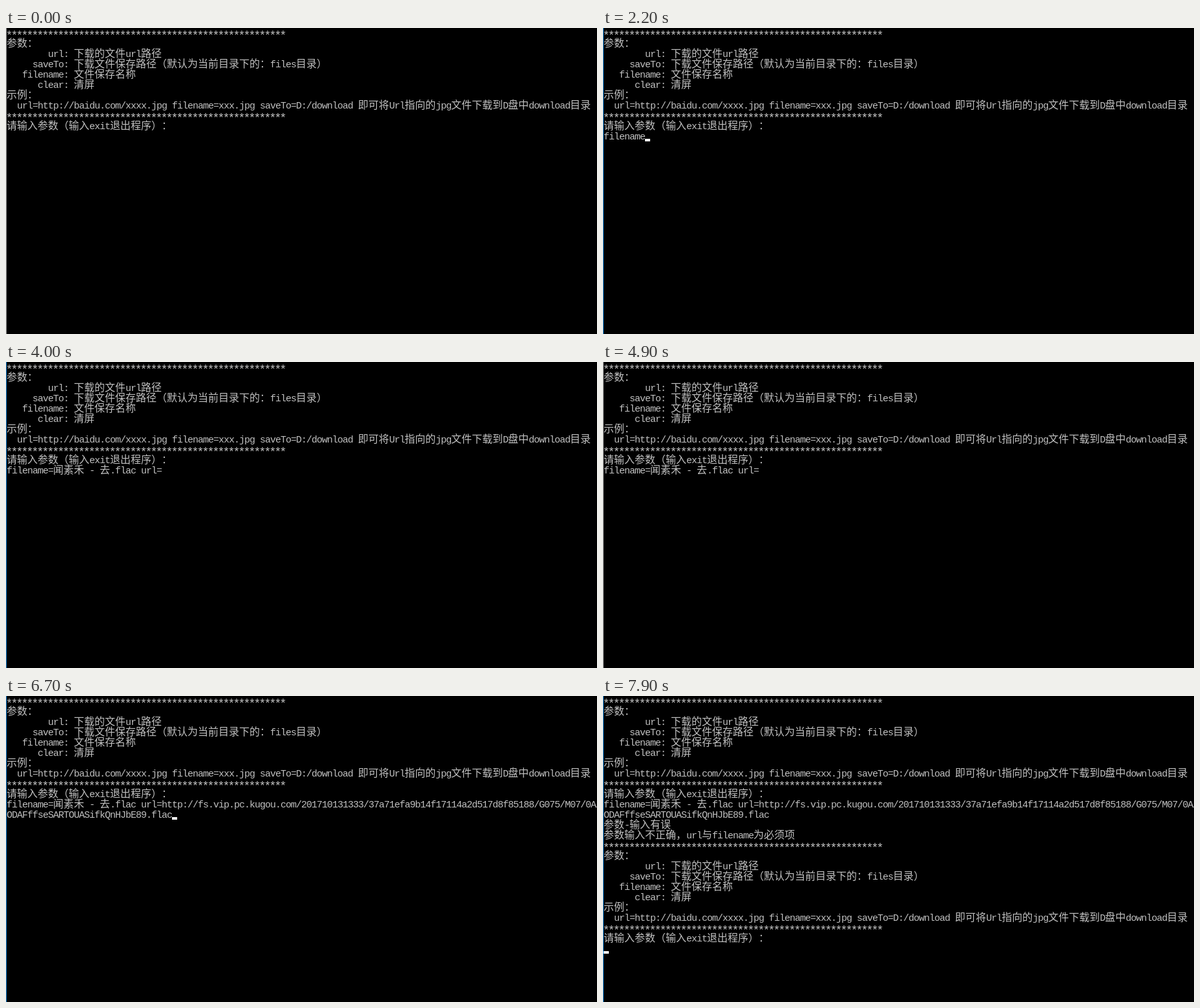
Recreate the animation shown at these times as an HTML page. Size 915 px wide and 475 px high, loop 8 s.

```html
<!DOCTYPE html>
<html lang="zh-CN">
<head>
<meta charset="utf-8">
<title>下载控制台</title>
<style>
  html, body { margin: 0; width: 100%; height: 100%; overflow: hidden; background: #000; }
  #stage { position: relative; width: 915px; height: 475px; overflow: hidden; background: #000; }
  /* 9px glyphs set one pixel tight on an 8px grid */
  #text {
    position: absolute; left: 1px; top: 2px; margin: 0;
    color: #c0c0c0; white-space: pre;
    font: 15px/16px "Liberation Mono", monospace; letter-spacing: -1px;
    font-kerning: none; font-variant-ligatures: none;
  }
  /* one wide glyph fills two cells */
  #text span {
    font: 300 16px/0 "Noto Sans CJK SC", "Noto Sans CJK", sans-serif;
    letter-spacing: 0; text-spacing-trim: space-all;
  }
  #text i {
    position: relative; left: -1.5px; top: 4px;
    font-style: normal; font-size: 18.333px; line-height: 0; letter-spacing: -3px;
  }
  #edge { position: absolute; left: 0; top: 0; width: 1px; height: 100%; background: #999; }
  #edge.active { background: #1883d7; }
  #cursor { position: absolute; width: 8px; height: 16px; box-sizing: border-box; }
  #cursor.bar { border-bottom: 4px solid #fff; }
  #cursor.box { border: solid #c0c0c0; border-width: 0 1px 1px 0; }
</style>
</head>
<body>
<div id="stage">
  <pre id="text"></pre>
  <div id="cursor"></div>
  <div id="edge"></div>
</div>
<script>
const LOOP = 8000;
const stars = '*'.repeat(54);
const menu = [
  stars,
  '参数：',
  '        url: 下载的文件url路径',
  '     saveTo: 下载文件保存路径（默认为当前目录下的：files目录）',
  '   filename: 文件保存名称',
  '      clear: 清屏',
  '示例：',
  '  url=http://baidu.com/xxxx.jpg filename=xxx.jpg saveTo=D:/download 即可将Url指向的jpg文件下载到D盘中download目录',
  stars,
  '请输入参数（输入exit退出程序）：',
  ''
].join('\n');

const typed = 'filename=闻素禾 - 去.flac url=';
const pasted = 'http://fs.vip.pc.kugou.com/201710131333/37a71efa9b14f17114a2d517d8f85188/G075/M07/0A/\n' +
  'ODAFffseSARTOUASifkQnHJbE89.flac';
const command = typed + pasted;
const answer = command + '\n参数-输入有误\n参数输入不正确，url与filename为必须项\n' + menu;
const ALL = command.length, DONE = answer.length;

// [start ms, characters shown after the menu, cursor style]
const steps = [
  [0, 0, ''], [600, 0, 'bar'], [1000, 0, 'box'],
  [1400, 2, 'bar'], [1500, 4, 'bar'],
  [1800, 5, 'bar'], [1900, 6, 'bar'], [2000, 7, 'bar'],
  [2100, 8, ''], [2200, 8, 'bar'], [2300, 9, 'bar'], [2400, 9, ''],
  [2600, 21, ''], [2700, 21, 'bar'], [2900, 21, ''],
  [3100, 22, 'bar'], [3200, 22, ''],
  [3500, 23, 'bar'], [3600, 24, 'bar'], [3700, 25, 'bar'],
  [3900, 26, 'bar'], [4000, 26, ''], [4400, 26, 'bar'], [4700, 26, ''],
  [6200, ALL, 'bar'], [6300, ALL, ''], [6700, ALL, 'bar'],
  [6800, DONE, 'bar'], [7500, DONE, ''], [7900, DONE, 'bar']
];

const [textEl, cursorEl, edgeEl] = ['text', 'cursor', 'edge'].map(id => document.getElementById(id));
const markup = s => s
  .replace(/[^\x00-\x7f]+/g, '<span>$&</span>')
  .replace(/\*+/g, '<i>$&</i>');
const columns = s => [...s].reduce((n, c) => n + (c > '\x7f' ? 2 : 1), 0);

let shown = null;

function show(step) {
  if (step === shown) return;
  shown = step;
  const [, count, style] = step;
  const text = menu + answer.slice(0, count);
  const lines = text.split('\n');
  textEl.innerHTML = markup(text);
  cursorEl.className = style;
  cursorEl.style.left = 1 + 8 * columns(lines[lines.length - 1]) + 'px';
  cursorEl.style.top = 16 * (lines.length - 1) + 'px';
}

function frame() {
  const t = performance.now() % LOOP;
  show(steps.filter(s => s[0] <= t).pop());
  edgeEl.className = (t >= 200 && t < 4900) || t >= 6000 ? 'active' : '';
  requestAnimationFrame(frame);
}
frame();
</script>
</body>
</html>
```
